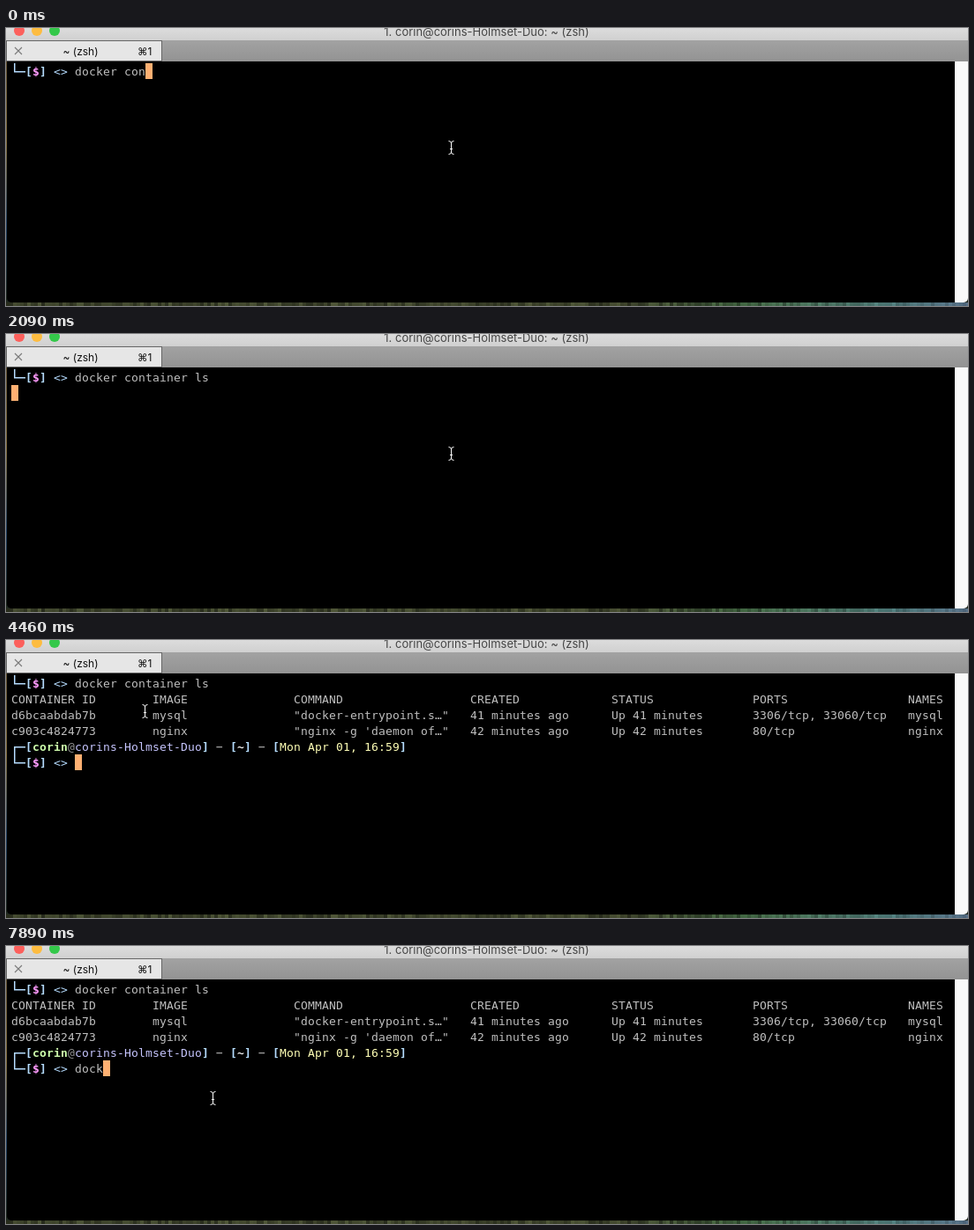
These frames come from a looping animation (1090x316 px, 8 s). An HTML page with a canvas:

```html
<!DOCTYPE html>
<html lang="en">
<head>
<meta charset="utf-8">
<title>Terminal</title>
<style>
html, body { margin: 0; width: 1090px; height: 316px; overflow: hidden; background: #000; }
canvas { display: block; }
</style>
</head>
<body>
<canvas id="stage" width="1090" height="316"></canvas>
<script>
const ctx = document.getElementById('stage').getContext('2d');
const LOOP = 8000, TICK = 148.87;
const CELL = 8, ROW = 18, LEFT = 6, TOP = 40;
const MONO = '13px "DejaVu Sans Mono", monospace';
const SANS = 'Inter, "Liberation Sans", sans-serif';
const GREY = '#bfbfbf', BLUE = '#b5dcff', PINK = '#ff9cfe', GREEN = '#ceffac',
      LILAC = '#c6c5fe', YELLOW = '#ffffb6', WHITE = '#eeeeee', ORANGE = '#ffb072';
const USER = 'corin', HOST = 'corins-Holmset-Duo';
const INPUT_COL = 9, IMAGE_COL = 20;

const TABLE = [
  ['CONTAINER ID', 'IMAGE', 'COMMAND', 'CREATED', 'STATUS', 'PORTS', 'NAMES'],
  ['d6bcaabdab7b', 'mysql', '"docker-entrypoint.s…"', '41 minutes ago', 'Up 41 minutes', '3306/tcp, 33060/tcp', 'mysql'],
  ['c903c4824773', 'nginx', '"nginx -g \'daemon of…"', '42 minutes ago', 'Up 42 minutes', '80/tcp', 'nginx'],
];

const RUN = 13, OUTPUT = 15, DRAG = 31, DESELECT = 43, RETYPE = 50;

const POINTER_KEYS = [
  { n: 23, x: 504, y: 136 },
  { n: 24, x: 439, y: 136 },
  { n: 28, x: 180, y: 58 },
  { n: DRAG, x: 153, y: 85 },
  { n: 37, x: 208, y: 85 },
  { n: 38, x: 208, y: 85 },
  { n: DESELECT, x: 234, y: 173 },
];

const clamp = (v, lo, hi) => Math.min(hi, Math.max(lo, v));
const mix = (a, b, p) => a + (b - a) * p;
const noise = i => Math.abs(Math.sin(i * 127.1) * 43758.5) % 1;

// The name is typed two letters a tick, then the rest one key at a time.
const firstTyped = n => 10 + 2 * Math.min(n, 3) + clamp(n - 4, 0, 2) + (n >= 9);
const nextTyped = n => Math.round(clamp(n - RETYPE, 0, 3) * 4 / 3);

function pointerAt(n) {
  const i = POINTER_KEYS.findIndex(key => key.n > n);
  if (i === 0) return POINTER_KEYS[0];
  if (i < 0) return POINTER_KEYS.at(-1);
  const a = POINTER_KEYS[i - 1], b = POINTER_KEYS[i];
  const p = Math.sin((n - a.n) / (b.n - a.n) * Math.PI / 2);
  return { x: mix(a.x, b.x, p), y: mix(a.y, b.y, p) };
}

function selectedCells(n) {
  if (n <= DRAG || n >= DESELECT) return 0;
  const cell = (pointerAt(n).x - LEFT) / CELL;
  return clamp(Math.round(cell) - IMAGE_COL + 1, 0, 6);
}

function rect(x, y, w, h, color) {
  ctx.fillStyle = color;
  ctx.fillRect(x, y, w, h);
}

function shade(y0, y1, ...colors) {
  const g = ctx.createLinearGradient(0, y0, 0, y1);
  colors.forEach((c, i) => g.addColorStop(i / (colors.length - 1), c));
  return g;
}

function panel(x, w, radii, color) {
  ctx.fillStyle = color;
  ctx.beginPath();
  ctx.roundRect(x, 38, w, 274, radii);
  ctx.fill();
}

function label(text, x, y, font, color, align = 'left') {
  ctx.font = font;
  ctx.textAlign = align;
  ctx.fillStyle = color;
  ctx.fillText(text, x, y);
}

// Writes on the character grid and returns the next free column.
function print(text, col, row, color = GREY, bold = false) {
  for (const ch of text)
    label(ch, LEFT + col++ * CELL, TOP + row * ROW + 14, (bold ? 'bold ' : '') + MONO, color);
  return col;
}

function printParts(parts, col, row) {
  for (const [text, color, bold] of parts) col = print(text, col, row, color, bold);
}

function corner(row, down) {
  const y = TOP + row * ROW;
  rect(9, down ? y + 9 : y, 1.5, 9, BLUE);
  rect(9, y + 9, 13, 1.5, BLUE);
}

function prompt(row) {
  corner(row, false);
  printParts([['[', BLUE, true], ['$', PINK, true], [']', BLUE, true], [' <>', BLUE]], 2, row);
}

function infoLine(row) {
  corner(row, true);
  printParts([
    ['[', BLUE, true], [USER, GREEN, true], ['@', '#959595'], [HOST, LILAC], [']', BLUE, true],
    [' − ', GREY], ['[', BLUE, true], ['~', WHITE, true], [']', BLUE, true],
    [' − ', GREY], ['[', BLUE, true], ['Mon Apr 01, 16:59', YELLOW], [']', BLUE, true],
  ], 2, row);
}

function cursor(col, row) {
  rect(LEFT + col * CELL, TOP + row * ROW, CELL, ROW, ORANGE);
}

// Each column is as wide as its longest cell plus 3, at least 20.
function printTable(row) {
  let col = 0;
  TABLE[0].forEach((_, c) => {
    TABLE.forEach((line, r) => print(line[c], col, row + r));
    col += Math.max(20, ...TABLE.map(line => line[c].length + 3));
  });
}

function desktop() {
  rect(0, 0, 1090, 316, shade(38, 316, '#6b5a3c', '#8a7444', '#28486c', '#20281c'));
  for (let x = 0; x < 1090; x += 4) {
    const sea = clamp((x - 700) / 390, 0, 1), light = 14 + 14 * noise(x);
    rect(x, 312, 4, 4, `hsl(${mix(75, 210, sea)} 22% ${light + 22 * sea}%)`);
  }
}

function chrome() {
  rect(0, 0, 1090, 14, shade(0, 14, '#dcdcdc', '#d0d0d0'));
  ['#fc605c', '#fdbc40', '#34c84a'].forEach((color, i) => {
    ctx.fillStyle = color;
    ctx.beginPath();
    ctx.arc(15 + 20 * i, 3, 6, 0, 2 * Math.PI);
    ctx.fill();
  });
  label(`1. ${USER}@${HOST}: ~ (zsh)`, 544.5, 8.5, '13px ' + SANS, '#454545', 'center');

  rect(0, 14, 1090, 24, shade(14, 38, '#a2a2a2', '#939393'));
  rect(0, 14, 177, 24, '#666');
  rect(1, 15, 175, 22, '#e6e6e6');
  ctx.strokeStyle = '#7a7a7a';
  ctx.lineWidth = 1.1;
  ctx.beginPath();
  ctx.moveTo(10, 22); ctx.lineTo(18, 30);
  ctx.moveTo(18, 22); ctx.lineTo(10, 30);
  ctx.stroke();
  label('~ (zsh)', 84.5, 31, '12px ' + SANS, '#111', 'center');
  label('⌘', 149, 31, '11.5px "DejaVu Sans", sans-serif', '#111');
  label('1', 160.5, 31, '12px ' + SANS, '#111');

  panel(1, 1089, [0, 0, 5, 5], '#000');
  panel(1075, 15, [0, 0, 5, 0], '#fafafa');
}

function drawPointer({ x, y }) {
  ctx.save();
  ctx.translate(Math.round(x) + 0.5, Math.round(y));
  ctx.strokeStyle = '#fff';
  ctx.lineWidth = 1;
  ctx.beginPath();
  for (const s of [-1, 1]) {
    ctx.moveTo(-3, 7.5 * s);
    ctx.quadraticCurveTo(0, 7.5 * s, 0, 5 * s);
    ctx.quadraticCurveTo(0, 7.5 * s, 3, 7.5 * s);
  }
  ctx.moveTo(0, -5); ctx.lineTo(0, 5);
  ctx.moveTo(-1.5, 1.5); ctx.lineTo(1.5, 1.5);
  ctx.stroke();
  ctx.restore();
}

function output(n) {
  const cells = selectedCells(n);
  rect(LEFT + (IMAGE_COL - 1) * CELL, TOP + 2 * ROW, cells * CELL, ROW, '#454a99');
  printTable(1);
  if (cells) print('mysql'.slice(0, cells - 1), IMAGE_COL, 2, '#f2f2f2');
  infoLine(4);
  prompt(5);
  cursor(print('dock'.slice(0, nextTyped(n)), INPUT_COL, 5), 5);
}

function draw(t) {
  const n = Math.floor(t / TICK + 0.13);
  desktop();
  chrome();
  prompt(0);
  const end = print('docker container ls'.slice(0, firstTyped(n)), INPUT_COL, 0);
  if (n < RUN) cursor(end, 0);
  else if (n < OUTPUT) cursor(0, 1);
  else output(n);
  drawPointer(pointerAt(n));
}

const start = performance.now();
function tick() {
  draw((performance.now() - start) % LOOP);
  requestAnimationFrame(tick);
}
tick();
</script>
</body>
</html>
```
